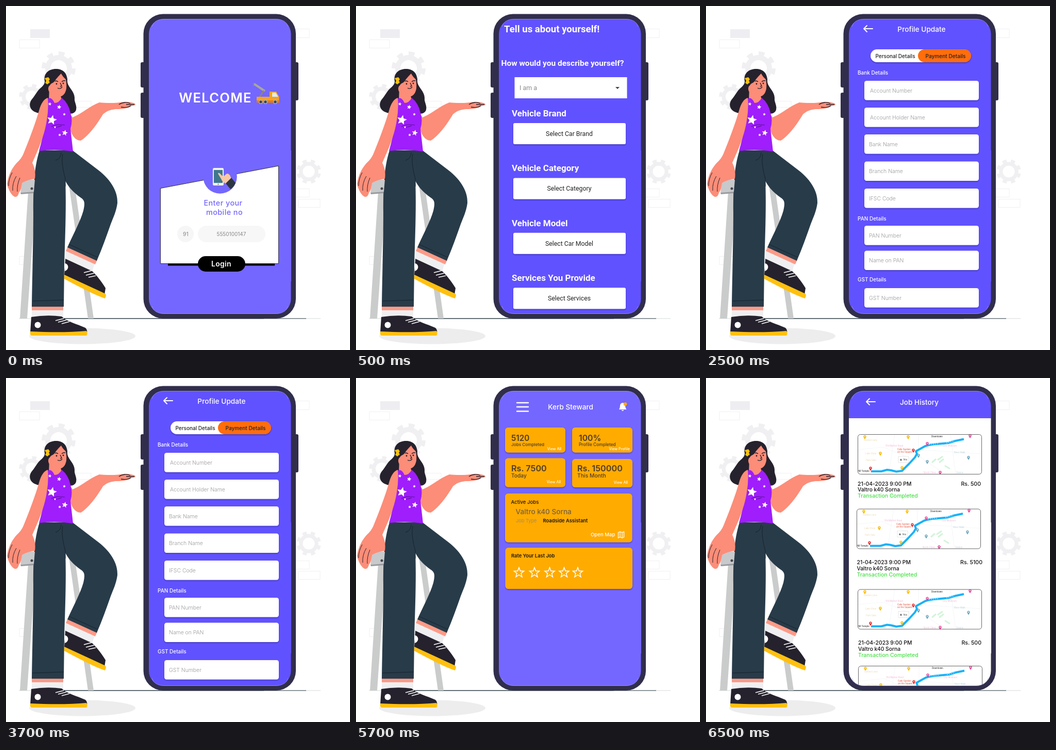
Write an HTML page that moves like this. It is 667 px wide and 667 px high and loops after 8 s.

```html
<!DOCTYPE html>
<html lang="en">
<head>
<meta charset="utf-8">
<title>App walkthrough</title>
<style>
html, body { margin: 0; width: 100%; height: 100%; overflow: hidden; background: #fff; }
svg { display: block; width: 100vw; height: 100vh; }
text { font-family: Inter, "Open Sans", sans-serif; font-weight: 500; white-space: pre; }
.roboto text { font-family: Roboto, Arial, sans-serif; }
.screen { opacity: 0; animation: page 8s step-end infinite; }
#welcome { animation-name: first; }
#about { animation-delay: -7.5s; }
#profile { animation-delay: -5.5s; }
#jobs { animation-delay: -3.5s; }
#history { animation-name: last; }
@keyframes first { 0% { opacity: 1; } 6.25%, 100% { opacity: 0; } }
@keyframes page { 0% { opacity: 1; } 25%, 100% { opacity: 0; } }
@keyframes last { 0% { opacity: 0; } 81.25%, 100% { opacity: 1; } }
</style>
</head>
<body>
<svg viewBox="0 0 667 667" xmlns="http://www.w3.org/2000/svg">
  <defs>
    <clipPath id="glass"><rect x="277" y="25" width="275.500" height="572" rx="29"/></clipPath>
    <clipPath id="card"><rect width="241" height="78" rx="5"/></clipPath>
    <filter id="drop" x="-10%" y="-20%" width="120%" height="150%">
      <feDropShadow dx="0" dy="1.5" stdDeviation="1.2" flood-color="#1d1470" flood-opacity=".45"/>
    </filter>
    <g id="gear" fill="none" stroke="#f0f0f2">
      <circle r="21" stroke-width="10"/>
      <circle r="29" stroke-width="8" pathLength="16" stroke-dasharray="1"/>
    </g>
    <path id="back" d="M18 0H1M7 -6L1 0L7 6" fill="none" stroke="#fff" stroke-width="2" stroke-linecap="round" stroke-linejoin="round"/>
  </defs>

  <!-- backdrop -->
  <rect x="47" y="45" width="38" height="17" fill="#eeeef2"/>
  <g fill="none" stroke="#f0f0f3">
    <path d="M26 65.500h39v16h-39zM134 184.500h31v12h-31zM26 485.500h34v16h-34zM560 44.500h28v17h-28zM560 354.500h28v16h-28zM567 374.500h42v16h-42z"/>
  </g>
  <use href="#gear" x="102" y="121"/>
  <use href="#gear" transform="translate(50 176) scale(.75)"/>
  <use href="#gear" transform="translate(587 321) rotate(10) scale(.72)"/>
  <ellipse cx="148" cy="640" rx="103" ry="15.500" fill="#ededed"/>
  <path d="M25 606H610" stroke="#d5dad8"/>
  <path d="M112 606H500" stroke="#37474f" stroke-width="1.500"/>
  <path d="M500 606H582" stroke="#37474f"/>
  <path d="M43 360h15L41 606H27zM121 340h11L170 606H159z" fill="#cacbcb"/>

  <!-- woman: hair and pointing arm -->
  <path d="M75 146C72 130 84 121 99 122C112 123 119 133 119 148C121 158 133 166 133 178C132 187 138 192 136 201C134 209 123 212 116 204L84 190C81 203 68 211 58 206C46 202 43 190 50 181C57 173 60 165 67 159C74 153 75 150 75 146Z" fill="#25222d"/>
  <path d="M120 203L129 216C150 207 162 194 181 187C199 189 217 188 230 186C241 186 251 188 251 191C249 194 241 193 240 196C230 200 220 200 212 200C199 202 195 204 188 210C176 230 161 251 145 261C134 261 127 250 124 238Z" fill="#fc8d78"/>
  <path d="M219 191C226 186 235 186 241 189M242 193C238 197 230 197 223 196M233 191L249 191" fill="none" stroke="#25222d" stroke-width="1.300"/>

  <!-- bent leg -->
  <path d="M116 473L172 499L167 515L114 491Z" fill="#efeff1"/>
  <path d="M120 466L177 492L173 501L116 475Z" fill="#fc9b87"/>
  <path d="M115 490L167 514C176 522 187 537 193 547L191 560L113 522Z" fill="#25222d"/>
  <path d="M113 521L193 558Q195 561 192 567Q172 561 113 529Z" fill="#ffc010"/>
  <path d="M114 499C122 500 123 511 114 514Z" fill="#fff"/>
  <path d="M151 517L166 513M155 522L171 518M160 526L174 523" stroke="#fff" stroke-width="1.700" fill="none"/>
  <path d="M66 280H129L180 319C204 338 217 360 216 382C214 398 208 410 203 423C195 446 186 471 176 494L119 468C131 441 144 418 150 397C153 384 153 378 147 373C128 360 113 344 108 318Z" fill="#283b49"/>
  <path d="M122 462L177 487" stroke="#16232d"/>

  <!-- standing leg -->
  <path d="M50 588H111V604H50Z" fill="#efeff1"/>
  <path d="M50 581H111V590H50Z" fill="#fc9b87"/>
  <path d="M49 603Q80 598 108 602C118 612 136 616 154 624Q158 628 157 633H47Z" fill="#25222d"/>
  <path d="M47 631Q110 634 156 630Q159 634 156 639H49Q46 637 47 631Z" fill="#ffc010"/>
  <circle cx="61.500" cy="618.500" r="6" fill="#fff"/>
  <path d="M96 610L112 606M101 613L117 609M108 616L123 612" stroke="#fff" stroke-width="1.700"/>
  <path d="M65 280H120L115 335C117 385 115 440 113 500L112 583H50C51 515 53 455 53 400C53 350 54 315 65 280Z" fill="#283b49"/>
  <path d="M51 572L112 570M107 284C106 292 104 297 96 299M110 287C107 302 111 320 115 335V350" fill="none" stroke="#16232d"/>

  <!-- torso and head -->
  <path d="M84 158L83 184Q94 200 108 181L104 168Z" fill="#fc8d78"/>
  <path d="M81 179Q89 176 94 188Q103 188 108 178Q121 188 125 207Q130 222 125 238L130 282Q98 277 64 281Q73 250 75 225Z" fill="#a01dfc"/>
  <path d="M88 234Q97 228 114 231M91 236Q101 235 108 232" fill="none" stroke="#5b119c" stroke-width="1.200"/>
  <g id="stars" fill="#fff"></g>
  <path d="M86 146C90 138 98 131 108 130C116 135 118 148 117 160C115 172 108 177 101 175C96 174 92 171 90 168C84 170 80 163 83 155Z" fill="#fc8d78"/>
  <path d="M75 148C75 128 90 120 102 123C112 124 118 130 119 144C115 142 110 137 107 131C101 137 98 140 95 145C92 150 87 149 85 154C81 156 81 163 83 169C84 179 79 185 72 187Z" fill="#25222d"/>
  <path d="M75 140l7-2 3 4-2 3 2 3-5 4-4-3 2-4z" fill="#ffc010"/>
  <path d="M95 146Q98 144 101 147M108 147Q111 144 115 145M100 159Q105 162 109 157M105 149L108 155L105 156" fill="none" stroke="#25222d" stroke-width="1.400"/>
  <circle cx="98" cy="151" r="1.400" fill="#25222d"/><circle cx="111" cy="150" r="1.400" fill="#25222d"/>

  <!-- resting arm and handset -->
  <path d="M31 335L56 337L54 360L28 363Z" fill="#c8c9cb"/>
  <path d="M28 362L54 360L53 363L29 365Z" fill="#9a9b9e"/>
  <circle cx="50" cy="354" r="2.500" fill="#45454d"/>
  <path d="M81 178C74 180 68 188 64 203C58 224 46 257 34 286Q30 296 21 304C12 314 5 326 2 345C4 354 9 366 17 370C23 371 24 365 25 362C29 358 30 350 31 343C40 338 48 336 56 335C58 322 55 312 51 304C62 280 75 250 79 222Q83 199 81 178Z" fill="#fc8d78"/>
  <path d="M12 323Q5 335 5 349M20 330Q12 343 13 358M27 333Q21 347 22 360" fill="none" stroke="#25222d"/>

  <!-- device -->
  <g fill="#302e4b">
    <rect x="261" y="109" width="12" height="49" rx="3"/><rect x="261" y="168" width="12" height="49" rx="3"/>
    <rect x="555" y="109" width="12" height="74" rx="3"/>
    <rect x="266.500" y="15.500" width="295.500" height="590.500" rx="38"/>
  </g>

  <g clip-path="url(#glass)">
    <g id="welcome" class="screen">
      <rect x="277" y="25" width="276" height="572" fill="#7467ff"/>
      <g id="truck">
        <path d="M481 151L502 165" stroke="#aaa69f" stroke-width="4"/>
        <path d="M480 149V156" stroke="#8a867f" stroke-width="2"/>
        <path d="M500 164L492 176" stroke="#8c8881" stroke-width="2.500"/>
        <path d="M486 176H511V166H524L529.500 176V187H486Z" fill="#f9a21d"/>
        <path d="M486 183H530V187.500H486Z" fill="#e27d15"/>
        <path d="M516 168H523L527.500 176H516Z" fill="#d8effa"/>
        <g fill="#3f4350" stroke="#b9bac2" stroke-width="1.200"><circle cx="494" cy="186" r="3.300"/><circle cx="503" cy="186" r="3.300"/><circle cx="522" cy="186" r="3.300"/></g>
      </g>
      <path d="M299.500 353.500L528.500 310V499.500H299.500Z" fill="#fff" stroke="#222" stroke-width=".9"/>
      <circle cx="415" cy="331" r="32.800" fill="#7467ff"/>
      <rect x="401" y="314" width="21" height="34" rx="2.500" fill="#f1f1f1"/>
      <rect x="403" y="318" width="17" height="25" fill="#3f788d"/>
      <circle cx="411.500" cy="345.500" r="1.200" fill="#888"/>
      <path d="M411 325Q412 322 415 325L421 331L427 326Q430 323 434 328L438 337L429 345Q420 343 417 335Z" fill="#f9c9a4"/>
      <path d="M426 344L437 333L445 343Q442 351 435 355Z" fill="#2d3543"/>
      <circle cx="348" cy="442" r="16" fill="#f6f6f6"/>
      <rect x="372" y="426" width="131" height="32" rx="16" fill="#f7f7f7"/>
      <path d="M314 501.500H521" stroke="#000" stroke-width="4"/>
      <rect x="372" y="485" width="92" height="30" rx="15" fill="#000"/>
    </g>

    <g id="about" class="screen roboto">
      <rect x="277" y="25" width="276" height="572" fill="#6152ff"/>
      <rect x="307.500" y="138" width="218" height="41" fill="#fff"/>
      <path d="M503 157H511L507 161Z" fill="#444"/>
    </g>

    <g id="profile" class="screen">
      <rect x="277" y="25" width="276" height="572" fill="#6152ff"/>
      <use href="#back" x="305" y="44"/>
      <g filter="url(#drop)">
        <rect x="319" y="84" width="115" height="25" rx="12.500" fill="#fff"/>
        <rect x="411" y="84" width="103" height="25" rx="12.500" fill="#ff6d08"/>
      </g>
    </g>

    <g id="jobs" class="screen">
      <rect x="277" y="25" width="276" height="572" fill="#7467ff"/>
      <path d="M312 48H334M312 56H334M312 64.500H334" stroke="#fff" stroke-width="2.400" stroke-linecap="round"/>
      <path d="M510 61Q512 58 512 54Q512 49 517 48Q522 49 522 54Q522 58 524.500 61ZM514.500 62H519.500Q517 66 514.500 62Z" fill="#fff"/>
      <circle cx="522" cy="50.500" r="3.300" fill="#ffab00"/>
    </g>

    <g id="history" class="screen">
      <rect x="277" y="25" width="276" height="572" fill="#fff"/>
      <rect x="277" y="25" width="276" height="53" fill="#6152ff"/>
      <use href="#back" x="310" y="46"/>
    </g>
  </g>
  <g fill="none" stroke="#a9a3ff" stroke-opacity=".6">
    <path d="M283 40Q287 26 306 25.500H524Q543 26 547 40"/>
    <path d="M283 582Q287 596 306 596.500H524Q543 596 547 582"/>
  </g>
</svg>

<script>
const $ = id => document.getElementById(id);
const add = (id, ...parts) => $(id).insertAdjacentHTML('beforeend', parts.join(''));
const write = (s, x, y, size, fill = '#fff', weight = 500, anchor = 'start', gap = 0) =>
  `<text x="${x}" y="${y}" font-size="${size}" fill="${fill}" style="font-weight:${weight};letter-spacing:${gap}em" text-anchor="${anchor}">${s}</text>`;
const mid = (s, x, y, size, fill, weight, gap) => write(s, x, y, size, fill, weight, 'middle', gap);
const end = (s, x, y, size, fill, weight) => write(s, x, y, size, fill, weight, 'end');
const box = (x, y, w, h, r, fill = '#fff') =>
  `<rect x="${x}" y="${y}" width="${w}" height="${h}" rx="${r}" fill="${fill}" filter="url(#drop)"/>`;

function star(x, y, r, inner = .45, turn = 0, attrs = '') {
  const pts = Array.from({ length: 10 }, (_, i) => {
    const a = (i * 36 - 90 + turn) * Math.PI / 180, d = i % 2 ? r * inner : r;
    return [x + d * Math.cos(a), y + d * Math.sin(a)].map(v => v.toFixed(1));
  });
  return `<polygon points="${pts.join(' ')}" ${attrs}/>`;
}

const CAR = 'Valtro k40 Sorna';

add('stars', ...[[89, 221, 10], [103, 196, 4.5], [85, 190, 3.5], [113, 210, 3], [95, 235, 2.5], [114, 246, 6], [104, 250, 3]]
  .map(([x, y, r]) => star(x, y, r, .45, 12)));

add('welcome',
  mid('WELCOME', 406, 187, 25.5, '#fff', 600, .05),
  mid('Enter your', 421, 387, 14.4, '#7467ff', 500, .03),
  mid('mobile no', 423.5, 405, 14.4, '#7467ff', 500, .03),
  mid('91', 348.5, 446, 10.5, '#888', 400),
  mid('5550100147', 437, 446, 10, '#888', 400),
  mid('Login', 417.5, 505, 14, '#fff', 600, .02));

add('about',
  write('Tell us about yourself!', 287, 51, 18.6, '#fff', 700),
  write('How would you describe yourself?', 281.5, 116, 15.5, '#fff', 700),
  write('I am a', 317, 163, 12.5, '#8a8a8a', 400),
  ...[['Vehicle Brand', 'Car Brand'], ['Vehicle Category', 'Category'], ['Vehicle Model', 'Car Model'], ['Services You Provide', 'Services']]
    .map(([label, pick], i) => {
      const y = 227 + i * 106.4;
      return write(label, 302, y - 13, 17, '#fff', 700) + box(305, y, 218, 41, 3) +
        mid('Select ' + pick, 413.5, y + 25, 12.3, '#222', 400);
    }));

add('profile',
  mid('Profile Update', 418, 50, 13.7),
  mid('Personal Details', 367, 101, 10, '#222'),
  mid('Payment Details', 464.5, 101, 10.1, '#222'),
  write('Bank Details', 294, 132.5, 10),
  write('PAN Details', 294, 416, 10),
  write('GST Details', 294, 533.5, 10),
  ...[['Account Number', 145], ['Account Holder Name', 197], ['Bank Name', 249], ['Branch Name', 301.5], ['IFSC Code', 354],
    ['PAN Number', 426], ['Name on PAN', 474.5], ['GST Number', 547]]
    .map(([s, y]) => box(307, y, 222, 37.5, 4.5) + write(s, y < 200 ? 318 : 316, y + 22.5, 10.4, '#999', 300)));

const amber = (x, y, w, h) => box(x, y, w, h, 6, '#ffab00');
const stat = (x, y, big, size, small, gap, smallSize) =>
  write(big, x, y, size, '#4b3c2c', 600) + write(small, x, y + gap, smallSize, '#4b3c2c');
add('jobs',
  mid('Kerb Steward', 416, 60.5, 13.6),
  amber(289, 96, 117, 48.5), amber(419, 96, 117, 48.5), amber(289, 155.5, 117, 56),
  amber(419, 157, 117, 55), amber(289, 224, 246.5, 94.5), amber(289.5, 329, 246.5, 80),
  stat(301, 122, '5120', 15.3, 'Jobs Completed', 10, 8.2),
  stat(432, 122, '100%', 15.8, 'Profile Completed', 10, 8.4),
  stat(301, 181, 'Rs. 7500', 16.2, 'Today', 12, 10.2),
  stat(429, 181, 'Rs. 150000', 16.2, 'This Month', 12, 10.4),
  end('View All', 398, 140, 7.1), end('View Profile', 531, 140, 7.1),
  end('View All', 397, 204, 7.1), end('View All', 527, 204.5, 7.1),
  write('Active Jobs', 300.5, 244, 9.6, '#1b1510'),
  write(CAR, 309.5, 263.5, 13.6, '#75613f'),
  write('Job Type', 310, 280, 9.2, '#a78a58', 400),
  write('Roadside Assistant', 362.5, 280, 9.4, '#1b1510', 600),
  write('Open Map', 455, 307, 9.6),
  '<path d="M508.500 299.500L512 298L516 299.500L519.500 298V308.500L516 310L512 308.500L508.500 310ZM512 298V308.500M516 299.500V310" fill="none" stroke="#fff" stroke-width="1.300"/>',
  write('Rate Your Last Job', 301, 348, 9.4, '#1b1510', 600),
  ...[316, 346, 375.5, 403.5, 430].map(x => star(x, 377.5, 10, .42, 0, 'fill="none" stroke="#fff" stroke-width="1.600"')));

const pin = (x, y, c) =>
  `<path d="M${x} ${y + 5}L${x - 2.4} ${y + 1}A2.700 2.700 0 1 1 ${x + 2.4} ${y + 1}Z" fill="${c}"/><circle cx="${x}" cy="${y - .5}" r="1" fill="#fff"/>`;
const tiny = (s, x, y, c) => write(s, x, y, 4.3, c, 500);
function map(x, y) {
  const pins = { '#fbbc04': [[14, 5], [98, 5], [44, 37], [86, 65]], '#ea2a2a': [[108, 31], [25, 66]],
    '#e8489a': [[135, 18], [218, 3], [160, 74]], '#6fa8bd': [[118, 41], [135, 53], [215, 45]] };
  return `<g transform="translate(${x} ${y})"><g clip-path="url(#card)"><rect width="241" height="78" fill="#fff"/>
    <path d="M0 30L50 25L110 50M118 0V42L170 78M60 78L72 0M180 0L190 78M118 30L241 38" fill="none" stroke="#f6f7f9" stroke-width="1.200"/>
    <path d="M144 55L152 48M155 50L165 43M158 55L167 48M169 61L179 67" stroke="#d3f4da" stroke-width="3"/>
    <path d="M26 72H46L57 69L65 70L75 72.500L86 71L100 57L111 45L115 38L113 33L131 23Q140 20 154 19L176 17L189 13L206 9.500" fill="none" stroke="#17b2f8" stroke-width="4" stroke-linejoin="round"/>
    <path d="M138 20L158 18M172 17L188 13" stroke="#79d6fc" stroke-width="2" stroke-dasharray="2"/>
    <rect x="79" y="43" width="20" height="12" fill="#fff" stroke="#ddd" stroke-width=".7"/><path d="M82 51L84 47L86 51Z" fill="#555"/>
    ${Object.entries(pins).map(([c, list]) => list.map(p => pin(...p, c)).join('')).join('')}
    ${tiny('Garden Lane', 12, 13, '#eddfba') + tiny('Lake View', 15, 39, '#eddfba') + tiny('Park Gate', 16, 52, '#eddfba')}
    ${tiny('Old Market Road', 54, 24, '#f5c3da') + tiny('Cafe Garden', 77, 31, '#e8614e') + tiny('on the Square', 77, 36, '#e8614e')}
    ${tiny('Downtown', 143, 6, '#333') + tiny('Hill Temple', 0, 73, '#333') + tiny('14m', 88, 51, '#666')}
    ${tiny('City Museum', 165, 24, '#f5c3da') + tiny('Station', 191, 76, '#c4dae1') + tiny('River Walk', 187, 37, '#c4dae1')}
    ${tiny('North Clinic', 128, 76, '#f5c3da')}</g>
    <rect x=".5" y=".5" width="240" height="77" rx="5" fill="none" stroke="#555" stroke-width=".9"/></g>`;
}
add('history',
  mid('Job History', 413.5, 52, 13.6),
  ...[[294, 109, 208.5, 'Rs. 500'], [292, 253.5, 361, 'Rs. 5100'], [294, 409.5, 517, 'Rs. 500'], [295, 558, 0, '']]
    .map(([x, y, line, fee], i) => map(x, y) + (line ? [
      write('21-04-2023 9:00 PM', x + i * .5, line, 10.4, '#111'),
      write(CAR, x + i * .5, line + 11.8, 10.3, '#111'),
      write('Transaction Completed', x + i * .5, line + 23.8, 10.5, '#46e046'),
      end(fee, [533, 536, 534][i], line, 10.6, '#111')].join('') : '')));
</script>
</body>
</html>
```
